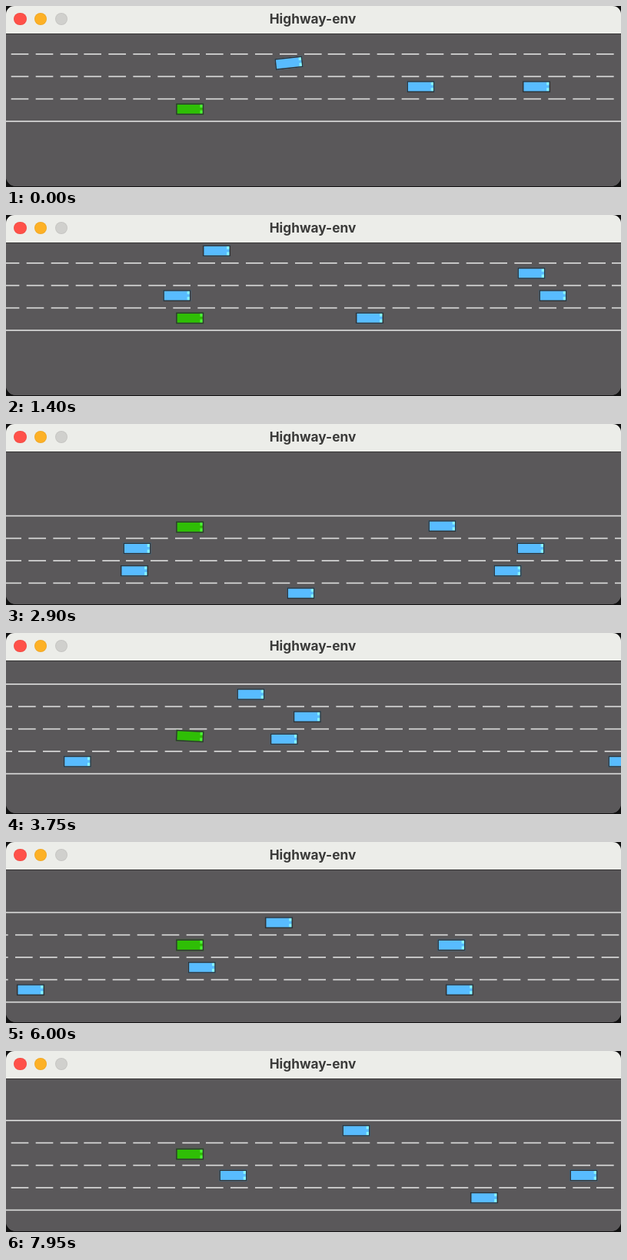
Recreate the animation shown at these times as an HTML page with a canvas. Size 800 by 237 pixels, loop 8000 ms.

```html
<!DOCTYPE html>
<html lang="en">
<head>
<meta charset="utf-8">
<title>Highway-env</title>
<style>
  html, body { margin: 0; width: 100%; height: 100%; overflow: hidden; background: #111; }
  .window { position: absolute; left: 0; top: 0; width: 800px; height: 236px; border-radius: 11px 11px 13px 13px; overflow: hidden; background: #5a585a; }
  canvas { position: absolute; left: 0; top: 0; }
  .bar { position: absolute; left: 0; top: 0; width: 800px; height: 36px; background: #ecede9; border-bottom: 1px solid #343334; }
  .bar i { position: absolute; top: 8.8px; width: 16.4px; height: 16.4px; border-radius: 50%; box-shadow: inset 0 0 0 1px rgba(0, 0, 0, .05); }
  .close { left: 10.4px; background: #ff5149; }
  .minimize { left: 37.1px; background: #fdb126; }
  .zoom { left: 63.8px; background: #d0d0cd; }
  .bar b { position: absolute; left: 0; width: 798px; text-align: center; font: 700 17.3px/34px Inter, Roboto, sans-serif; color: #3b3b3a; }
</style>
</head>
<body>
<div class="window">
  <canvas id="road" width="800" height="236"></canvas>
  <div class="bar">
    <i class="close"></i><i class="minimize"></i><i class="zoom"></i>
    <b>Highway-env</b>
  </div>
</div>
<script>
const LOOP = 8000, STEP = 50, RESET = 7450;
const PX = 4 / 3;                 // screen pixels per simulator pixel
const METRE = 5.5 * PX;
const LANE = 4 * METRE, STRIPE_GAP = 4.33 * METRE, STRIPE = 17 * PX;
const DECISION = 191, FIRST_DECISION = -106;
const STEER = 0.0152;             // lateral response rate per ms
const ctx = document.getElementById('road').getContext('2d');

const ease = (t, tau) => t > 0 ? 1 - Math.exp(-t / tau) : 0;
const snap = v => Math.floor(v / PX) * PX;

// moves: one lane decision per step, ^ up, v down.
// traffic: time -> cars seen then, as [lane, x, own closing speed in px/s].
const firstRun = {
  lane: 3,
  moves: '.........^.^.^....vv.v...^..^.....^...v',
  closing: 342,
  travel: t => 1.17333 * t - 11.5 * ease(t, 112) - 16.5 * ease(t - 1600, 200),
  traffic: {
    0: [[2, 539.5, 405], [2, 690, 334]],
    1400: [[0, 274, 395], [3, 473], [1, 683.5], [2, 711.5, 363]],
    2900: [[3, 383.5], [0, 567.5, 293], [2, 652.5], [1, 682.5]],
    4750: [[3, 459.5], [2, 643.5, 311], [0, 782.5]],
    6000: [[1, 579.5, 358], [3, 590, 330]],
    7250: [[0, 346.5, 385], [1, 635.5], [2, 520.5], [0, 804]]
  }
};
const secondRun = {
  lane: 1.01,
  moves: '',
  closing: 141,
  travel: t => 0.97778 * (t - 7950),
  traffic: { 7950: [[2, 295.5], [0, 455.5], [3, 622], [2, 751.5]] }
};

// Progress and heading of one lane change, age ms after it began.
function laneChange(age) {
  const z = Math.max(0, age) * STEER, decay = Math.exp(-z);
  return { shift: 1 - (1 + z) * decay, heading: 0.42 * z * decay };
}

function drive(lane, moves, t) {
  let pos = lane, heading = 0;
  [...moves].forEach((move, i) => {
    if (move === '.') return;
    const side = move === '^' ? -1 : 1;
    const change = laneChange(t - FIRST_DECISION - i * DECISION);
    pos += side * change.shift;
    heading += side * change.heading;
  });
  return { pos, heading };
}

function drawRoad(top, travel) {
  const offset = 7.2 - travel;
  const phase = offset - Math.ceil(offset / STRIPE_GAP) * STRIPE_GAP;
  ctx.fillStyle = '#d9d9d9';
  for (let line = 0; line <= 4; line++) {
    const y = top + line * LANE - 0.85;
    if (line % 4 === 0) ctx.fillRect(0, y, 800, 1.7);
    else for (let x = phase; x < 800; x += STRIPE_GAP) ctx.fillRect(snap(x), y, STRIPE, 1.7);
  }
}

function drawCar(x, y, heading, body, lamp) {
  ctx.save();
  ctx.translate(x, y);
  ctx.rotate(heading);
  ctx.fillStyle = body;
  ctx.fillRect(-18, -7.4, 36, 14.8);
  ctx.fillStyle = lamp;
  ctx.fillRect(13.2, -6, 4, 4);
  ctx.fillRect(13.2, 1.6, 4, 4.2);
  ctx.strokeStyle = '#303335';
  ctx.lineWidth = 1.5;
  ctx.strokeRect(-17.3, -6.7, 34.6, 13.4);
  ctx.restore();
}

function render(t) {
  const run = t < RESET ? firstRun : secondRun;
  const ego = drive(run.lane, run.moves, t);
  const top = 37 + snap(63.01 * PX - ego.pos * LANE) + PX / 2;
  const drawTraffic = (lane, x, heading = 0) =>
    drawCar(x, top + (lane + .5) * LANE - 1.4, heading, '#58bcff', '#86f4ff');

  ctx.fillStyle = '#5a585a';
  ctx.fillRect(0, 0, 800, 236);
  drawRoad(top, run.travel(t));
  for (const [seen, cars] of Object.entries(run.traffic)) {
    for (const [lane, x, closing = run.closing] of cars) {
      drawTraffic(lane, x - closing * (t - seen) / 1000);
    }
  }
  if (run === firstRun) {
    const merge = laneChange(t + 25);
    drawTraffic(1 - merge.shift, 368 - run.closing * t / 1000, -merge.heading);
  }
  drawCar(239.2, 135, ego.heading, '#2fbe06', '#4cf436');
}

const begin = performance.now();
function tick() {
  const t = (performance.now() - begin) % LOOP;
  render(Math.floor(t / STEP) * STEP);
  requestAnimationFrame(tick);
}
tick();
</script>
</body>
</html>
```
